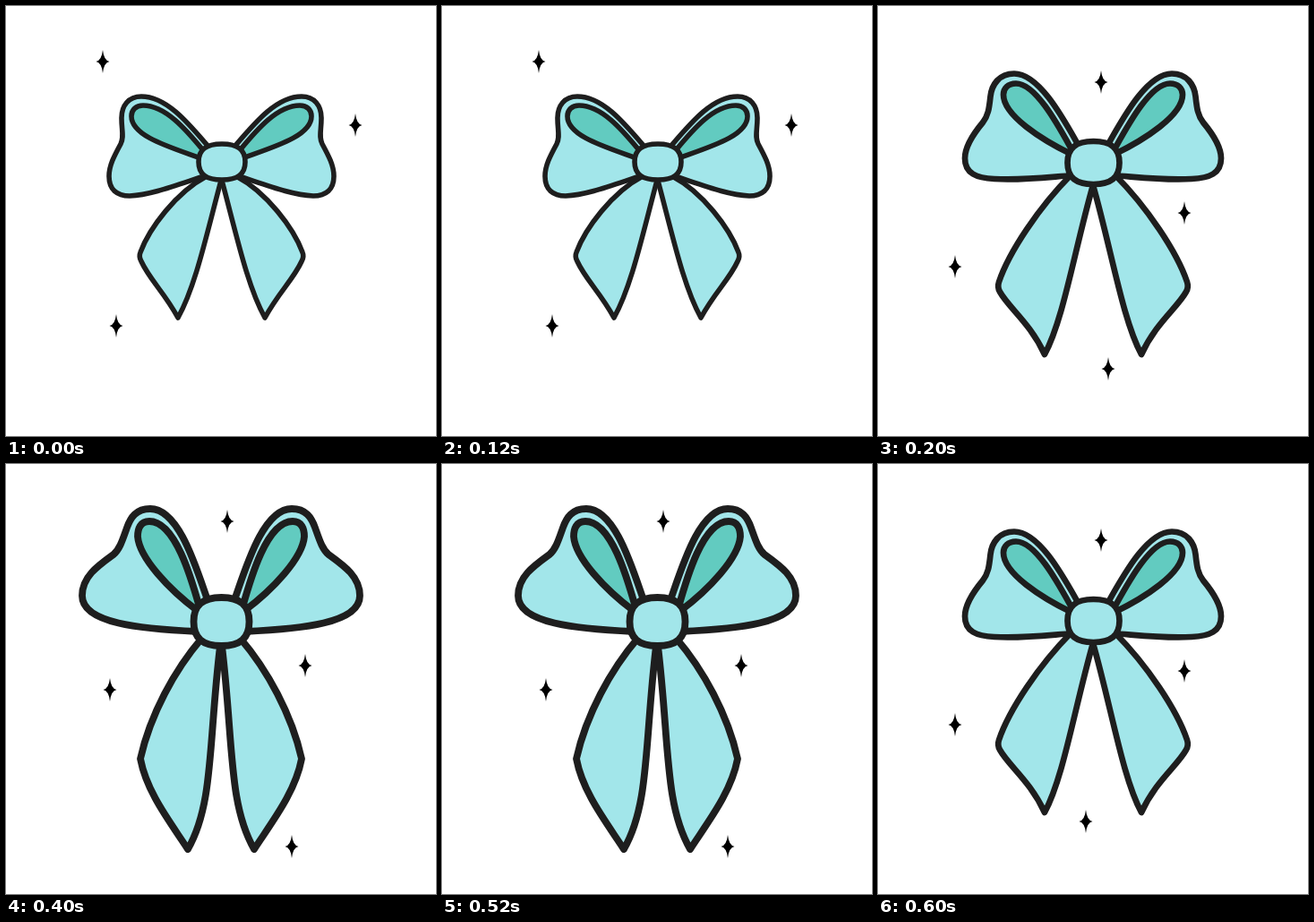
These frames come from a looping animation (480x480 px, 800 ms). An HTML page with a canvas:

```html
<!DOCTYPE html>
<html lang="en">
<head>
<meta charset="utf-8">
<title>Bow</title>
<style>
html, body { margin: 0; width: 100%; height: 100%; overflow: hidden; background: #fff; }
canvas { display: block; width: 480px; height: 480px; }
</style>
</head>
<body>
<canvas id="stage" width="480" height="480"></canvas>
<script>
const ctx = document.getElementById('stage').getContext('2d');
const INK = '#1e1e1e', AQUA = '#a2e6ea', TEAL = '#62cbc0';
const STEP = 200;

// Left half of the bow; the right half is its mirror image about the axis.
const folded = {
  axis: 240.5, line: 5.6,
  tail: 'M224 190 C190 208 160 248 150 275 Q148 280 151 285 C160 305 177 320 192 348 C212 312 224 254 240.5 193 Z',
  wing: 'M226 157 C203 130 179 101 151 101 C137 101 129 111 129 125 C129 139 132 146 128 154 C121 167 115 178 115 190 C115 205 124 212 138 212 C162 211 190 200 224 189 Z',
  loop: 'M220 161 C201 138 178 111 153 111 C145 111 140 116 140 123 C140 146 185 158 220 171 Z',
  knot: [174, 26, 20]
};
const half = {
  axis: 240, line: 6.7,
  tail: 'M216 188 C180 224 146 275 135 308 Q133 314 136 319 C146 337 170 354 186 389 C207 350 219 274 240 200 Z',
  wing: 'M224 156 C207 126 180 75.5 152 75.5 C135 75.5 127 88 125.5 101 C124 115 123 122 117 130 C107 142 97 156 97 170 C97 187 110 192 130 193 C160 195 190 191 218 189 Z',
  loop: 'M216 160 C201 133 176 86.5 154 86.5 C145 86.5 140 92 140 99 C140 122 182 149 217 166 Z',
  knot: [175, 29, 24]
};
const open = {
  axis: 240, line: 7.8,
  tail: 'M219 194 C188 230 161 280 150 329 C157 366 182 398 203 430 C232 380 226 310 239 203 Z',
  wing: 'M225 152 C212 115 193 50 161 50 C145 50 139 60 135 71 C130 85 127 95 120 101 C102 114 85 126 85 147 C85 178 150 184 214 187 Z',
  loop: 'M216 160 C207 128 189 64 160 64 C150 64 147 72 147 81 C149 105 182 140 214 164 Z',
  knot: [176, 31, 27]
};
const drift = [[249, 85], [342, 231], [86, 291]];
const poses = [
  { bow: folded, stars: [[108, 62], [390, 133], [123, 357]] },
  { bow: half, stars: [...drift, [257, 405]] },
  { bow: open, stars: [[247, 64], [334, 225], [116, 252], [319, 427]] },
  { bow: half, stars: [...drift, [232, 399]] }
];
for (const bow of [folded, half, open])
  for (const part of ['tail', 'wing', 'loop']) bow[part] = new Path2D(bow[part]);

function paint(path, fill) {
  ctx.fillStyle = fill;
  ctx.fill(path);
  ctx.stroke(path);
}

function knotPath(x, y, rx, ry) {
  const p = new Path2D(), k = 0.68;
  p.moveTo(x, y - ry);
  p.bezierCurveTo(x + rx * k, y - ry, x + rx, y - ry * k, x + rx, y);
  p.bezierCurveTo(x + rx, y + ry * k, x + rx * k, y + ry, x, y + ry);
  p.bezierCurveTo(x - rx * k, y + ry, x - rx, y + ry * k, x - rx, y);
  p.bezierCurveTo(x - rx, y - ry * k, x - rx * k, y - ry, x, y - ry);
  return p;
}

function drawBow(bow) {
  ctx.strokeStyle = INK;
  ctx.lineWidth = bow.line;
  ctx.lineJoin = 'round';
  for (const mirrored of [false, true]) {
    ctx.save();
    if (mirrored) {
      ctx.translate(2 * bow.axis, 0);
      ctx.scale(-1, 1);
    }
    paint(bow.tail, AQUA);
    paint(bow.wing, AQUA);
    paint(bow.loop, TEAL);
    ctx.restore();
  }
  paint(knotPath(bow.axis + 0.5, ...bow.knot), AQUA);
}

function drawStar([x, y]) {
  const w = 7.5, h = 13, c = 1.2;
  ctx.fillStyle = '#000';
  ctx.beginPath();
  ctx.moveTo(x, y - h);
  ctx.quadraticCurveTo(x + c, y - c, x + w, y);
  ctx.quadraticCurveTo(x + c, y + c, x, y + h);
  ctx.quadraticCurveTo(x - c, y + c, x - w, y);
  ctx.quadraticCurveTo(x - c, y - c, x, y - h);
  ctx.fill();
}

function draw(now) {
  const pose = poses[Math.floor(Math.max(0, now) / STEP) % poses.length];
  ctx.fillStyle = '#fff';
  ctx.fillRect(0, 0, 480, 480);
  drawBow(pose.bow);
  pose.stars.forEach(drawStar);
}

let start;
function tick(now) {
  start ??= now;
  draw(now - start);
  requestAnimationFrame(tick);
}
draw(0);
requestAnimationFrame(tick);
</script>
</body>
</html>
```
